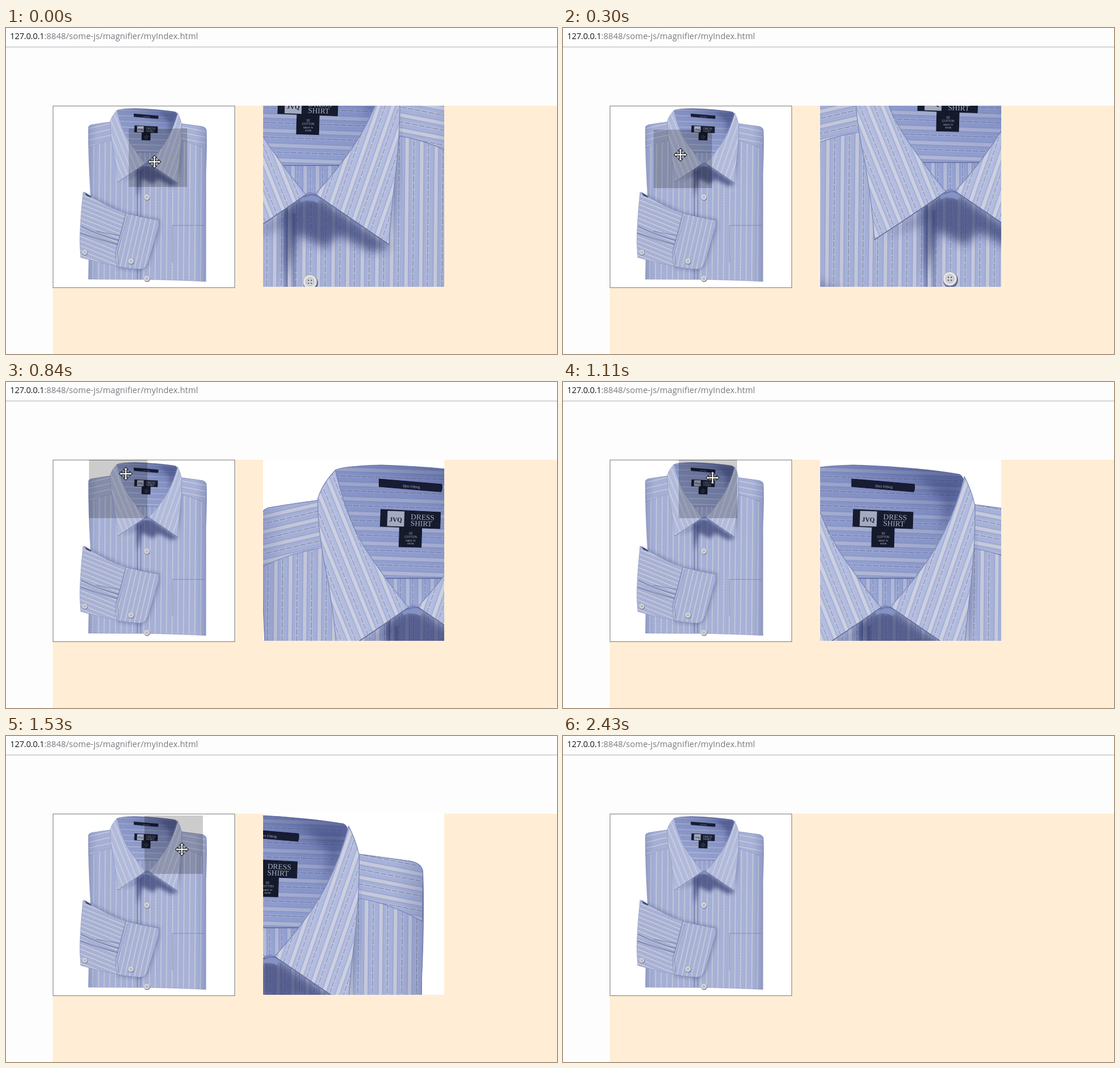
Animation, 943 px wide and 558 px high, one loop 2.83 s. Source, as an HTML page:

```html
<!DOCTYPE html>
<html lang="en">
<head>
<meta charset="utf-8">
<title>Magnifier</title>
<style>
html, body { margin: 0; width: 100%; height: 100%; overflow: hidden; background: #fdfdfd; }
svg { display: block; }
.url { font: 14.35px "Open Sans", "Noto Sans", sans-serif; letter-spacing: .08px; fill: #777b80; }
.host { letter-spacing: -.25px; fill: #17191c; }
.brand { font: 13px "Liberation Serif", serif; fill: #a9b0c4; }
.tiny { font: 5px "Liberation Sans", sans-serif; fill: #a3acc0; text-anchor: middle; }
.seam { fill: none; stroke: #5f6995; stroke-width: 1.3; }
.soft { fill: none; stroke: #3c4778; stroke-opacity: .3; stroke-width: 5; }
</style>
</head>
<body>
<svg width="943" height="558" viewBox="0 0 943 558">
  <defs>
    <linearGradient id="bodyShade">
      <stop offset="0" stop-color="#3d4a80" stop-opacity=".22"/>
      <stop offset=".08" stop-color="#5a68a0" stop-opacity=".03"/>
      <stop offset=".9" stop-color="#5a68a0" stop-opacity="0"/>
      <stop offset="1" stop-color="#3d4a80" stop-opacity=".25"/>
    </linearGradient>
    <linearGradient id="neckShade" x1=".75" y1="0" x2=".35" y2=".8">
      <stop offset="0" stop-color="#1f2c68" stop-opacity=".5"/>
      <stop offset=".35" stop-color="#2d3d86" stop-opacity=".2"/>
      <stop offset="1" stop-color="#2d3d86" stop-opacity="0"/>
    </linearGradient>
    <filter id="blur" x="-20%" y="-20%" width="140%" height="140%"><feGaussianBlur stdDeviation="8"/></filter>
    <g id="shirt"></g>
  </defs>

  <rect width="943" height="558" fill="#fdfdfd"/>
  <text class="url" x="7" y="19"><tspan class="host">127.0.0.1</tspan>:8848/some-js/magnifier/myIndex.html</text>
  <path d="M0 32.5H943" stroke="#b3b3b3"/>
  <rect x="80" y="133" width="863" height="425" fill="#ffeed5"/>
  <rect x="80.5" y="133.5" width="311" height="311" fill="#fff" stroke="#808080"/>
  <use id="thumb" href="#shirt"/>
  <rect id="lens" width="100" height="100" fill="#000" fill-opacity=".2"/>
  <svg id="zoom" x="440" y="133" width="310" height="310" overflow="hidden">
    <rect width="310" height="310" fill="#fff"/>
    <use id="view" href="#shirt"/>
  </svg>
  <path id="move" fill="#fff" stroke="#222" stroke-width="1.1" d="M0-11l4 4h-2.5v5.5h5.5v-2.5l4 4-4 4v-2.5h-5.5v5.5h2.5l-4 4-4-4h2.5v-5.5h-5.5v2.5l-4-4 4-4v2.5h5.5v-5.5h-2.5z"/>
  <path id="arrow" fill="#fff" stroke="#111" d="M.5.5V16l3.6-3.4 2.4 5.6 2.2-1-2.4-5.4h5z"/>
</svg>
<script>
const $ = id => document.getElementById(id);
const SCALE = 800 / 310, LOOP = 2830;

// Cloth: one stripe pattern, turned for each panel
const stripes = (id, angle, base, light, period = 25) => `
  <pattern id="${id}" width="${period}" height="24" patternUnits="userSpaceOnUse" patternTransform="rotate(${angle})">
    <rect width="${period}" height="24" fill="${base}"/>
    <path d="M0 1.5H${period}M0 4.5H${period}M0 7.5H${period}M0 10.5H${period}M0 13.5H${period}M0 16.5H${period}M0 19.5H${period}M0 22.5H${period}" stroke="#fff" stroke-opacity=".09"/>
    <path d="M6 0V24" stroke="${light}" stroke-width="6"/>
    <path d="M2 0V24M10 0V24" stroke="#7d89b8" stroke-opacity=".5"/>
    <path d="M${period * .7} 0V24" stroke="${light}" stroke-opacity=".6" stroke-width="4"/>
    <path d="M${period * .7} 0V24" stroke="#5d6488" stroke-opacity=".75" stroke-dasharray="10 2"/>
  </pattern>`;

const panel = (d, fill, edge = '#7683b4') => `<path d="${d}" fill="${fill}" stroke="${edge}" stroke-width="1.1"/>`;
const seam = (d, cls = 'seam') => `<path class="${cls}" d="${d}"/>`;
const shadow = (d, o) => `<path d="${d}" fill="#202c60" opacity="${o}" filter="url(#blur)"/>`;
const button = (x, y, r) => `<g transform="translate(${x} ${y})">
  <circle cx="1" cy="2" r="${r + 1}" fill="#59648f"/>
  <circle r="${r}" fill="#e4e4e6" stroke="#a5a6ad"/>
  <circle r="${r * .6}" fill="#d2d3d8" stroke="#b1b2ba"/>
  <path d="M-2.5-2.5h.1M2.5-2.5h.1M-2.5 2.5h.1M2.5 2.5h.1" stroke="#55586a" stroke-width="2.4" stroke-linecap="round"/></g>`;
const tiny = (x, y, s, size = 5) => `<text class="tiny" x="${x}" y="${y}" style="font-size:${size}px">${s}</text>`;

const body = 'M155 93Q157 85 168 82Q215 74 256 69L567 77L655 89Q675 93 676 108Q679 180 674 290L674 774Q500 766 400 765L155 764Q160 520 165 397Q158 290 155 167Z';
const leftLeaf = 'M281 18Q258 42 251 67Q251 125 265 190Q279 260 284 335Q345 296 406 253Q362 199 330 149Q300 98 281 18Z';
const rightLeaf = 'M549 29Q561 52 567 78Q568 140 560 215Q552 280 548 338Q488 297 422 252Q470 200 502 147Q533 91 549 29Z';
const neck = 'M281 18Q292 11 360 9Q470 13 540 25Q550 29 552 60L540 250L414 264L290 250L270 60Z';
const sleeve = 'M132 379L165 397Q240 446 320 472L276 635L283 707Q195 690 121 668Q114 598 119 531Q123 450 132 379Z';
const cuff = 'M320 472Q395 492 467 503L465 530Q440 620 418 690Q406 720 384 720Q330 718 281 707Q272 670 276 635Q300 560 320 472Z';

const blue = '#a4afd9', pale = '#c5c9da', deep = '#93a1d3', mist = '#b3bbd8', fair = '#b0bae0', snow = '#ccd0df';

$('shirt').innerHTML =
  stripes('front', .5, blue, pale) + stripes('yokeL', 77, blue, pale) + stripes('yokeR', 101, blue, pale) +
  stripes('back', 92, deep, mist) + stripes('lining', 0, deep, mist, 21) +
  stripes('leafL', -22, fair, snow, 23) + stripes('leafR', 19, fair, snow, 23) +
  stripes('arm', -68, blue, pale, 19) + stripes('wrist', 13, blue, pale, 21) +
  panel(body, 'url(#front)') +
  panel('M155 93Q157 85 168 82Q215 74 256 69L262 150Q205 159 157 183Z', 'url(#yokeL)') +
  panel('M567 77L655 89Q675 93 676 108L675 192Q620 161 565 152Z', 'url(#yokeR)') +
  `<path d="${body}" fill="url(#bodyShade)"/>` +
  seam('M374 262V764') + seam('M371 262V764', 'soft') + seam('M386 285V764', 'soft') +
  seam('M526 526V690M526 526H668') +
  shadow('M366 280L400 255L425 255L552 342L520 352L462 322L440 345L392 320L372 400Z', .6) +
  shadow('M300 330L390 268L370 310Z', .25) +
  shadow('M560 110Q572 180 562 260L550 335L540 300Z', .25) +
  panel(neck, 'url(#back)') +
  `<path d="M330 203H500L414 262Z" fill="url(#lining)"/>` + seam('M340 203H490') +
  `<path d="${neck}" fill="url(#neckShade)"/>` +
  shadow('M470 28L545 38L530 95L505 130L515 75Z', .3) +
  panel('M356 33L463 42Q465 48 462 55L356 46Z', '#171c33', '#10152a') +
  `<g transform="rotate(4 410 46)">${tiny(411, 48, 'Slim  Fitting', 6)}</g>` +
  panel('M359 85L461 90L460 118L358 114Z', '#161b2e', '#10152a') +
  `<g transform="rotate(2 410 102)"><rect x="370" y="89" width="29" height="26" fill="#a4aac0"/>
    <text x="384.5" y="107" text-anchor="middle" style="font:bold 11px 'Liberation Serif',serif" fill="#1b2035">JVQ</text>
    <text class="brand" x="410" y="102">DRESS</text><text class="brand" x="410" y="113">SHIRT</text></g>` +
  panel('M391 116H429L428 150L390 149Z', '#151a2b', '#10152a') +
  tiny(410, 128, '32', 6) + tiny(410, 134, 'COTTON') + tiny(410, 140, 'MADE IN', 4) + tiny(410, 145, 'INDIA', 4) +
  panel('M394 256L414 249L435 257L426 267Q410 259 398 266Z', '#8492c6') + seam('M404 257Q415 250 426 255') +
  panel(leftLeaf, 'url(#leafL)') + panel(rightLeaf, 'url(#leafR)') +
  seam('M284 335Q345 296 406 253M548 338Q488 297 422 252') +
  shadow('M128 382L165 395L322 470L470 500L470 540L420 700L388 728L280 714L290 700Z', .3) +
  panel(sleeve, 'url(#arm)') + panel('M138 380L165 397L168 404L146 394Z', '#34416f') +
  seam('M122 530Q200 570 288 592M120 560Q200 590 284 612M190 552Q240 562 292 570', 'soft') +
  seam('M122 530Q200 570 288 592M120 558Q200 586 284 608') +
  panel(cuff, 'url(#wrist)', '#65709f') +
  seam('M328 482Q306 570 285 640Q283 670 289 698') +
  button(413, 402, 12) + button(413, 761, 12) + button(139, 645, 11) + button(343, 684, 12);

$('thumb').setAttribute('transform', `translate(81 134) scale(${1 / SCALE})`);

// time, lens x, lens y, pointer x, pointer y
const hover = [
  [0, 210, 172, 254, 229], [160, 188, 173, 231, 226], [300, 155, 174, 201, 217],
  [450, 136, 150, 184, 196], [570, 128, 133, 179, 181], [720, 131, 133, 188, 166],
  [840, 142, 133, 205, 157], [980, 169, 133, 230, 158], [1110, 198, 133, 256, 164],
  [1260, 220, 133, 277, 173], [1410, 231, 134, 292, 184], [1530, 237, 136, 301, 194]
];
// time, pointer x, pointer y
const leave = [
  [1680, 520, 268], [1800, 745, 345], [1920, 857, 389], [2070, 888, 438],
  [2190, 908, 490], [2310, 919, 540], [2430, 930, 570]
];

const at = (steps, t) => steps.findLast(s => s[0] <= t);
const show = (id, on) => $(id).setAttribute('visibility', on ? 'visible' : 'hidden');
const place = (id, x, y) => $(id).setAttribute('transform', `translate(${x} ${y})`);

let last;
function draw(t) {
  const inside = t < leave[0][0];
  const step = at(inside ? hover : leave, t);
  if (step === last) return;
  last = step;
  for (const id of ['lens', 'zoom', 'move']) show(id, inside);
  show('arrow', !inside);
  if (inside) {
    const [, lx, ly, px, py] = step;
    place('lens', lx, ly);
    place('view', (81 - lx) * SCALE, (133 - ly) * SCALE);
    place('move', px, py);
  } else {
    place('arrow', step[1], step[2]);
  }
}

const start = performance.now();
function tick() {
  draw((performance.now() - start) % LOOP);
  requestAnimationFrame(tick);
}
tick();
</script>
</body>
</html>
```
